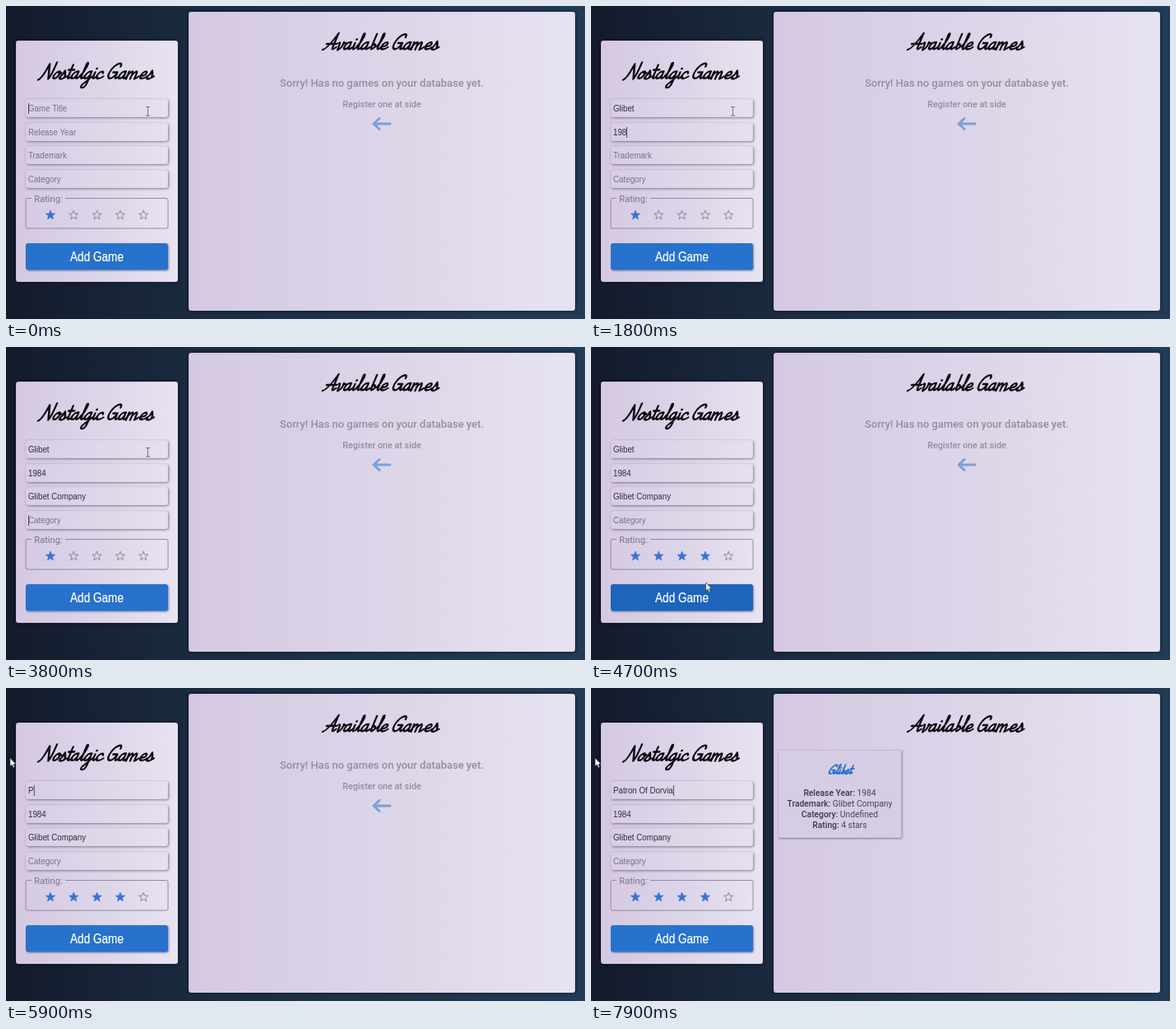
Write an HTML page that moves like this. It is 704 by 380 pixels and loops after 8000 ms.

```html
<!DOCTYPE html>
<html lang="en">
<head>
<meta charset="utf-8">
<title>Nostalgic Games</title>
<style>
  html, body { margin: 0; width: 100%; height: 100%; overflow: hidden; }
  body { position: relative; background: linear-gradient(90deg, #141a2c, #1b2c41 35%, #223c55); }
  .panel, .field, svg { position: absolute; box-sizing: border-box; }
  .panel { border-radius: 3px; background: linear-gradient(90deg, #d5c9e1, #ddd6e9 55%, #e8e3f1);
    box-shadow: 0 0 4px rgba(0, 0, 0, .6), inset 0 0 1px rgba(50, 45, 70, .6); }
  .form { left: 12px; top: 42px; width: 197px; height: 293px; }
  .list { left: 222px; top: 7px; width: 470px; height: 363px; }
  .field { left: 24px; width: 173px; height: 22px; border-radius: 3px;
    background: linear-gradient(90deg, #d8cde4, #e6e0ef);
    box-shadow: 1px 1px 3px rgba(30, 25, 45, .5), inset 0 0 1px rgba(90, 80, 110, .3); }
  .line { position: absolute; left: 3px; top: 0; white-space: pre; color: #2f2d3a;
    font: 11.5px/22px "Liberation Sans", Arial, sans-serif;
    transform: scaleX(.85); transform-origin: 0 50%; }
  .line.empty { color: #777281; }
  .line.picked span { background: #2f6fd0; color: #fff; }
  .line i { position: absolute; top: 4.5px; width: 1px; height: 13px; background: #333; }
  svg { left: 0; top: 0; width: 704px; height: 380px; }
  text { font-family: Roboto, "Open Sans", sans-serif; text-anchor: middle; }
  .script { fill: none; stroke-linecap: round; stroke-linejoin: round; }
  .card text { font-size: 10.3px; fill: #4a4656; }
  .card tspan { font-weight: 500; fill: #3d3948; }
</style>
</head>
<body>
<div class="panel form"></div>
<div class="panel list"></div>
<svg viewBox="0 0 704 380">
  <defs>
    <filter id="soft" x="-10%" y="-20%" width="120%" height="150%">
      <feDropShadow dx="1" dy="1" stdDeviation="1.2" flood-opacity=".4"/>
    </filter>
  </defs>
  <g id="titles"></g>

  <path d="M31 233.500H26a2 2 0 0 0-2 2V268a2 2 0 0 0 2 2H195a2 2 0 0 0 2-2V235.500a2 2 0 0 0-2-2H72"
    fill="none" stroke="#918b9c"/>
  <text x="51.5" y="238" font-size="11.2" fill="#7b7684">Rating:</text>
  <g id="stars"></g>
  <rect id="button" x="24" y="288" width="173" height="32.5" rx="3" filter="url(#soft)"/>
  <text transform="translate(110.5 310) scale(.85 1)" fill="#fff" stroke="#fff" stroke-width=".25"
    style="font: 16px 'Liberation Sans', Arial, sans-serif">Add Game</text>

  <g id="empty" font-weight="500" fill="#938e9c">
    <text x="457" y="98" font-size="12.95">Sorry! Has no games on your database yet.</text>
    <text x="457" y="123" font-size="10.75">Register one at side</text>
    <path d="M467 143H447M454 136.500L447 143L454 149.500" fill="none" stroke="#7b9fd9"
      stroke-width="3" stroke-linecap="round" stroke-linejoin="round"/>
  </g>

  <g id="card" class="card">
    <rect x="228" y="75.5" width="149" height="106" fill="#d6cce3" stroke="#c5bed5" filter="url(#soft)"/>
    <text x="302.5" y="131"><tspan>Release Year:</tspan> 1984</text>
    <text x="302.5" y="144"><tspan>Trademark:</tspan> Glibet Company</text>
    <text x="302.5" y="157"><tspan>Category:</tspan> Undefined</text>
    <text x="302.5" y="170"><tspan>Rating:</tspan> 4 stars</text>
  </g>

  <path id="beam" d="M170 122.500H175M172.500 122.500V133M170 133H175" fill="none" stroke="#77727f"/>
  <path id="arrow" d="M0 0V10L2.200 8L4 11.700L5.500 11L4 7.400H7Z"
    fill="#fff" stroke="#333848" stroke-width=".7"/>
</svg>
<script>
const $ = id => document.getElementById(id);
const svgEl = (parent, tag, attrs) => {
  const el = document.createElementNS('http://www.w3.org/2000/svg', tag);
  for (const key in attrs) el.setAttribute(key, attrs[key]);
  return parent.appendChild(el);
};

// Brush letters share a few upright strokes and are slanted when written
const foot = 'V-2q1 3 4-1';
const stem = (x, height) => `M${x}-${height}${foot}`;
const bar = (x, y, width) => `M${x}-${y}h${width}`;
const bowl = 'M6-8C3-11 0-6 0-3S4 1 6-5';
const curl = 'C5-11 0-8 0-4S4 1 8-3';
const arch = x => `M${x}-4q4-8 5-3V0`;
const brush = {
  N: [15, 'M-2 1Q2 0 4-18L10 0Q12-4 12-20'],
  G: [14, 'M11-15C12-21 4-20 1-10S7 4 10-8H5' + stem(10, 8)],
  A: [14, 'M-2 0Q3-1 9-20' + foot + bar(0, 7, 12)],
  a: [10, bowl + stem(6, 9)],
  b: [8, stem(2, 19) + 'Q7-4 5-6T2-4'],
  c: [8, 'M6-7' + curl],
  e: [8.5, 'M1-4Q6-4 6-7' + curl],
  g: [9.5, bowl + 'M6-9V6C5 13-1 11 1 7T9-3'],
  i: [5, stem(1, 8) + bar(1, 12.5, .5)],
  l: [6, 'M0-4C5-11 4-22 2-19' + foot],
  m: [16, 'M0 0V-9' + arch(0) + arch(5) + foot],
  o: [8, bowl + 'Q6-9 4-9Q5-6 8-7'],
  s: [8, 'M0-2Q3-6 3-10Q7-3 5-1T0-1M5-1L8-3'],
  t: [6, stem(2, 17) + bar(-1, 11, 7)],
  v: [9, 'M0-8Q2-10 2-4T3 0Q7-3 6-9Q7-7 9-8'],
  ' ': [5, '']
};

function write(parent, word, x, y, size, color) {
  const group = svgEl(parent, 'g', {
    class: 'script', role: 'img', 'aria-label': word, stroke: color,
    'stroke-width': 1.2 + 1.2 / size,
    transform: `translate(${x} ${y}) scale(${size}) skewX(-23)`
  });
  let pen = 0;
  for (const letter of word) {
    const [advance, d] = brush[letter];
    if (d) svgEl(group, 'path', { d, transform: `translate(${pen})` });
    pen += advance;
  }
}
write($('titles'), 'Nostalgic Games', 41.5, 88.5, 1, '#0b0a10');
write($('titles'), 'Available Games', 387, 53, 1, '#0b0a10');
write($('card'), 'Glibet', 288.5, 104.5, .6, '#2d70cb');

const starShape = Array.from({ length: 10 }, (_, i) => {
  const r = i % 2 ? 2.5 : 5.9, a = i * Math.PI / 5;
  return `${r * Math.sin(a)},${-r * Math.cos(a)}`;
}).join(' ');
const stars = Array.from({ length: 5 }, (_, i) => svgEl($('stars'), 'polygon', {
  points: starShape, transform: `translate(${54 + 28.3 * i} 254)`, 'stroke-width': .8
}));

const lines = ['Game Title', 'Release Year', 'Trademark', 'Category'].map((hint, i) => {
  const field = document.createElement('div');
  field.className = 'field';
  field.style.top = 113 + 28.5 * i + 'px';
  field.innerHTML = '<div class="line"><span></span><i></i></div>';
  document.body.insertBefore(field, document.querySelector('svg'));
  const line = field.firstChild;
  return { line, hint, span: line.firstChild, caret: line.lastChild };
});

// Each burst adds its text at an even pace; a fresh one replaces what was there
const bursts = [
  { field: 0, text: 'Glibet', from: 300, to: 600 },
  { field: 1, text: '19', from: 1100, to: 1200 },
  { field: 1, text: '84', from: 1800, to: 1900 },
  { field: 2, text: 'Glibet Company', from: 2400, to: 3500 },
  { field: 0, text: 'Patron', from: 5900, to: 6300, fresh: true },
  { field: 0, text: ' Of Dorvia', from: 6500, to: 7200 }
];
const focus = [
  { field: 0, from: -100 }, { field: 1, from: 800 }, { field: 2, from: 2100 },
  { field: 3, from: 3800 }, { field: -1, from: 4000 }, { field: 0, from: 5500 }
];
const pointer = [
  { t: 4200, x: 168, y: 150 }, { t: 4500, x: 139, y: 254 }, { t: 4800, x: 140, y: 302 },
  { t: 5100, x: 139, y: 279 }, { t: 5300, x: 54, y: 93 }, { t: 5600, x: 5, y: 85 }
];
const blink = 165;

const within = (t, from, to) => t >= from && t < to;
const clamp = k => Math.min(1, Math.max(0, k));
const show = (el, on) => { el.style.visibility = on ? 'visible' : 'hidden'; };
const started = (list, t) => list.filter(item => item.from <= t);

function typed(field, t) {
  return started(bursts, t).filter(b => b.field === field).reduce((before, b) => {
    const k = clamp((t - b.from) / (b.to - b.from));
    const part = b.text.slice(0, 1 + Math.floor(k * (b.text.length - 1)));
    return b.fresh ? part : before + part;
  }, '');
}

function caretOn(t) {
  const touched = Math.max(
    ...started(focus, t).map(f => f.from),
    ...started(bursts, t).map(b => Math.min(t, b.to)));
  return Math.floor((t - touched) / blink) % 2 === 0;
}

function pointerAt(t) {
  const i = Math.max(1, pointer.findIndex(p => p.t > t));
  const last = pointer[pointer.length - 1];
  const [a, b] = t >= last.t ? [last, last] : [pointer[i - 1], pointer[i]];
  const k = clamp((t - a.t) / (b.t - a.t || 1));
  return [a.x + (b.x - a.x) * k, a.y + (b.y - a.y) * k];
}

function draw(time) {
  const t = Math.floor(time / 100) * 100;
  const active = started(focus, t).pop().field;
  const picked = within(t, 5500, 5900);

  lines.forEach(({ line, hint, span, caret }, i) => {
    const text = typed(i, t);
    span.textContent = text || hint;
    line.classList.toggle('empty', !text);
    line.classList.toggle('picked', picked && i === active);
    caret.style.left = text ? '100%' : '0';
    show(caret, i === active && !picked && caretOn(t));
  });

  const rating = t < 4500 ? 1 : 4;
  stars.forEach((star, i) => {
    const full = i < rating;
    star.setAttribute('fill', full ? '#3873d6' : 'none');
    star.setAttribute('stroke', full ? '#3873d6' : '#7c7786');
  });
  $('button').setAttribute('fill', within(t, 4700, 5200) ? '#1d65ba' : '#2672cc');

  show($('empty'), t < 6100);
  show($('card'), t >= 6100);
  show($('beam'), t < 4200);
  show($('arrow'), t >= 4200);
  $('arrow').setAttribute('transform', `translate(${pointerAt(t)})`);
}

const start = performance.now();
function tick() {
  draw((performance.now() - start) % 8000);
  requestAnimationFrame(tick);
}
tick();
</script>
</body>
</html>
```
